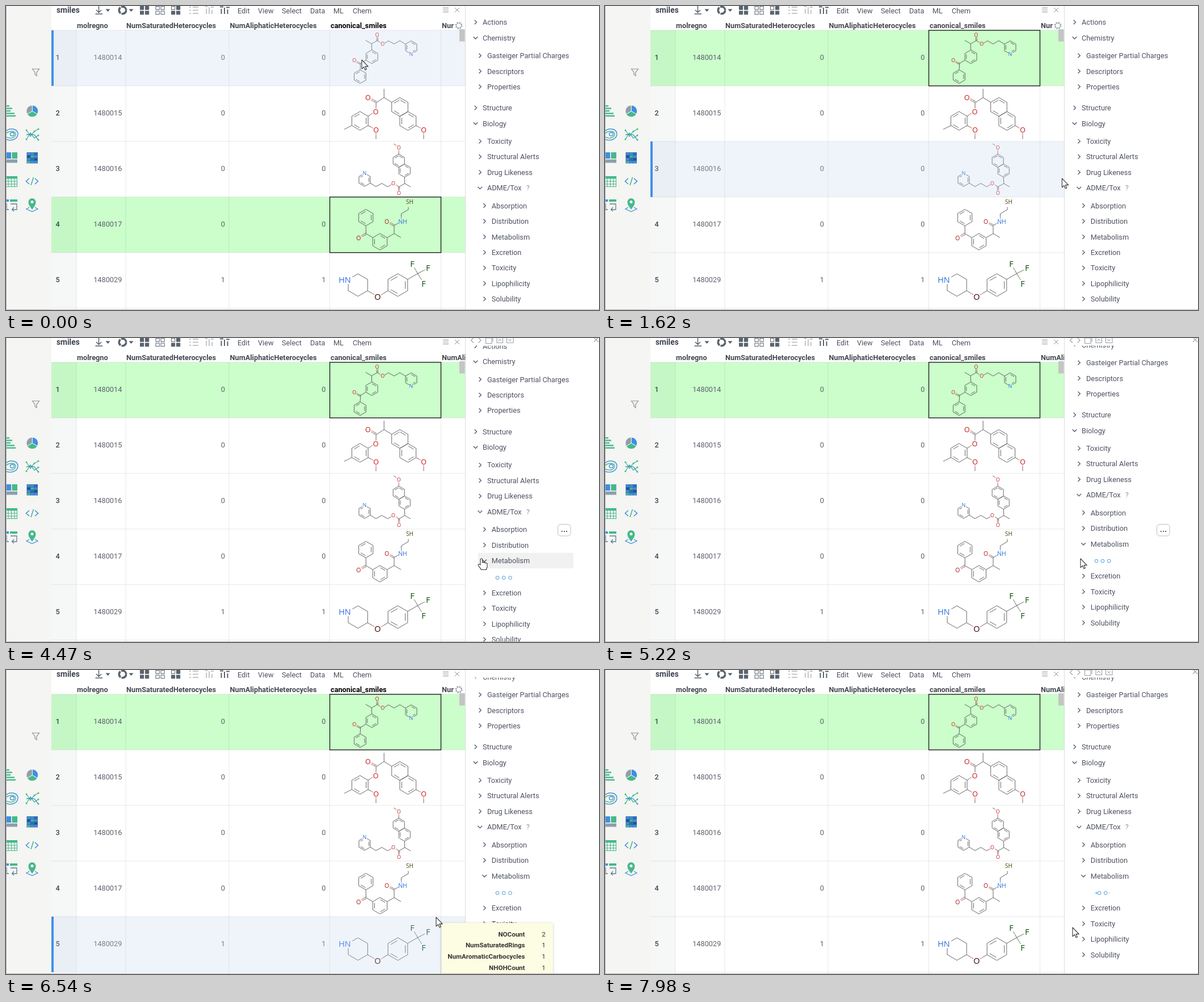
These frames come from a looping animation (1045 by 536 pixels, 8000 ms). An HTML page:

```html
<!DOCTYPE html>
<html lang="en">
<head>
<meta charset="utf-8">
<title>Molecule grid</title>
<style>
html, body { margin: 0; width: 100%; height: 100%; overflow: hidden; background: #fff; }
svg { display: block; width: 1045px; height: 536px; font: 12.74px Roboto, Arial, sans-serif; }
text { white-space: pre; }
.b { font-weight: 700; }
.m { font-weight: 500; }
.e { text-anchor: end; }
.c { text-anchor: middle; }
.l { fill: none; stroke: #4d5a66; stroke-width: 1.3; }
.atom { font-family: "Open Sans", "DejaVu Sans", sans-serif; text-anchor: middle; }
.tip text { font-size: 11.55px; fill: #333; }
</style>
</head>
<body>
<svg id="stage" viewBox="0 0 1045 536" xmlns="http://www.w3.org/2000/svg"></svg>
<script>
const LOOP = 8000, PITCH = 98, TOP = 42.8;
const INK = '#4d5261', BLUE = '#3f8fe0', GREEN = '#45b98a', STEEL = '#8d9fab';
const RED = '#c81818', NITRO = '#2c6fe0', FLUOR = '#0c4a0c';

const text = (x, y, s, cls = '', fill = INK, extra = '') =>
  `<text x="${x}" y="${y + 4.5}" class="${cls}" fill="${fill}" ${extra}>${s}</text>`;
const rect = (x, y, w, h, fill, extra = '') =>
  `<rect x="${x}" y="${y}" width="${w}" height="${h}" fill="${fill}" ${extra}/>`;
const line = (d, color, width = 1, extra = '') =>
  `<path d="${d}" fill="none" stroke="${color}" stroke-width="${width}" ${extra}/>`;
const fill = (d, color) => `<path d="${d}" fill="${color}"/>`;
const many = (n, f) => Array.from({ length: n }, (_, i) => f(i)).join('');

// ---- molecules ----
// Pointy-top hexagon; inner lines on the listed edges, a gap at one corner.
function ring(cx, cy, r, doubles = '', gap = -1) {
  const at = (k, q) => {
    const a = (k % 6) * Math.PI / 3 - Math.PI / 2;
    return [cx + q * Math.cos(a), cy + q * Math.sin(a)];
  };
  const edge = (k, q, trim) => {
    const a = at(k, q), b = at(k + 1, q);
    const mix = (p, o, f) => [p[0] + (o[0] - p[0]) * f, p[1] + (o[1] - p[1]) * f];
    const s = k === gap ? .42 : trim, e = (k + 1) % 6 === gap ? .42 : trim;
    const p = mix(a, b, s), o = mix(b, a, e);
    return `M${p.map(v => v.toFixed(1))}L${o.map(v => v.toFixed(1))}`;
  };
  return many(6, k => edge(k, r, 0)) + [...doubles].map(k => edge(+k, r * .76, .06)).join('');
}
const atom = (x, y, s, size, color) =>
  `<text x="${x}" y="${y + size * .36}" class="atom" font-size="${size}" fill="${color}">${s}</text>`;
const mol = (bonds, red, blue, atoms) =>
  line(bonds, '#4c4c4c', .85) + line(red, '#c04a4a', .85) + line(blue, '#4a7fd0', .85) +
  atoms.map(a => atom(...a)).join('');

const molecules = [
  mol(ring(624, 124.5, 12, '135') + ring(644.7, 89.5, 12, '024') + ring(714, 73, 11.6, '024', 3) +
    'M624 112.5L625 101L634.4 95.5M625 101L621.5 99.4M624.5 103L620.5 101M644.7 77.5L644.3 66.6L633.7 60.5' +
    'M644.3 66.6L654.3 61L658 63.4M653.3 61V57.5M655.4 61V57.5M669 64.5L674 61.4L684 67L694 61.2L704 67.2',
    'M653.3 57.5V54.5M655.4 57.5V54.5M621.5 99.4L618 97.6M620.5 101L617.2 99.2M658 63.4L660.3 64.8M667 65.6L669 64.5', 'M710 82L711.5 83',
    [[654, 50.3, 'O', 9, RED], [613.8, 96.2, 'O', 9, RED], [663.8, 67, 'O', 9, RED], [714, 84.7, 'N', 9, NITRO]]),
  mol(ring(623.8, 202.5, 16.5, '135') + ring(694, 178, 16.5, '035') + ring(708.3, 202.7, 16.5, '024') +
    'M596 217.5L609.5 210.7M638 194.2L642.5 191.4M638 210.7L643 213.3M652 179.5L652.2 170.5L666.2 161.5V146' +
    'M666.2 161.5L679.7 169.7M652.2 170.5L647.5 168M653 168.4L648.5 165.8M652 228.5V234.5M722.6 210.8L727 213.3M736 228.5V234.5',
    'M642.5 191.4L646.5 188.8M643 213.3L646.8 215.4M652 181V179.5M647.5 168L643 165.4M648.5 165.8L644 163.3M652 224V228.5M727 213.3L730.8 215.4M736 224V228.5', '',
    [[637.8, 161.7, 'O', 12.5, RED], [651.5, 186, 'O', 12.5, RED], [652, 218.3, 'O', 12.5, RED], [736, 218.3, 'O', 12.5, RED]]),
  mol(ring(692.2, 272.8, 11.6, '035') + ring(702.3, 290.2, 11.6, '024') + ring(632, 306.5, 11.6, '135', 0) +
    'M683.2 243L686 244.8M692.2 261.2V257.5M702.3 301.8L702.8 313L713 318.8M702.8 313L692.6 318.8L689 316.5' +
    'M691.5 318.8V322M693.6 318.8V322M677 316.2L672.5 318.7L662.2 312.7L652 318.4L642 312.3',
    'M686 244.8L688.4 246.4M692.2 257.5V254M689 316.5L687 315.2M691.5 322V325.3M693.6 322V325.3M677 316.2L679.4 314.8', '',
    [[692.2, 249.3, 'O', 9, RED], [682.6, 312.5, 'O', 9, RED], [692.4, 330, 'O', 9, RED], [632, 295, 'N', 9, NITRO]]),
  mol(ring(634.2, 373, 14.5, '135') + ring(659, 415.6, 14.5, '024') +
    'M634.2 387.5L634.4 401.5L646.5 408.4M634 400.3L630 402.7M635 402.7L631 405M671.6 408.4L684 401.3L696 408.3' +
    'M684 401.3V387L690 383.6M683.5 388L680 386M684.5 386L681 384M696.5 371V366.5L709 359V354.5',
    'M630 402.7L626 405M631 405L627 407M680 386L676 383.7M681 384L677 381.8', 'M690 383.6L692 382.4M696.5 375V371',
    [[621.3, 408.8, 'O', 10.5, '#a81818'], [671, 380.6, 'O', 10.5, '#a81818'], [699, 380.6, 'NH', 10.5, NITRO], [711.5, 345.3, 'SH', 10, '#54470c']]),
  mol(ring(620.2, 492, 19.8, '', 5) + ring(690.5, 492, 20, '135') +
    'M637.3 502L645 506.5M664.5 507.2L673.2 502M707.8 482L725.5 471.8L722.5 466.5M725.5 471.8L732 468.4M725.5 471.8L729.3 477.8',
    'M645 506.5L649.5 509.2M660.5 509.6L664.5 507.2', '',
    [[597, 482.4, 'HN', 14.5, NITRO], [655, 513.2, 'O', 14.5, '#3d0c08'], [716, 454.5, 'F', 14.5, FLUOR], [743.7, 462, 'F', 14.5, FLUOR], [736, 490, 'F', 14.5, FLUOR]]) +
    line('M722.5 466.5L719.3 461M732 468.4L738 465.3M729.3 477.8L732.6 483', '#3e6b3e', .85)
];

// ---- side icons ----
const wedge = (from, color) => {
  const at = a => `${46.3 + 10.4 * Math.cos(a)} ${185.4 + 10.4 * Math.sin(a)}`;
  return `<path d="M46.300 185.400L${at(from)}A10.400 10.400 0 0 1 ${at(from + 2.094)}Z" fill="${color}" stroke="#f5f5f3"/>`;
};
const sideIcons = () => {
  const pin = 'M46 359C41 352 39.500 349.500 39.500 345.500A6.500 6.500 0 0 1 52.500 345.500C52.500 349.500 51 352 46 359Z';
  return line('M46.500 111H58.500L54 117V123L51 120.500V117Z', '#8b9299', 1.2) +
    many(5, i => rect(0, 175 + i * 4.4, [6, 11, 8, 15, 17][i], 2.4, GREEN)) +
    wedge(-Math.PI / 2, BLUE) + wedge(Math.PI / 6, GREEN) + wedge(Math.PI * 5 / 6, STEEL) +
    line('M0 221C6 214 20 216 21 225C21 235 9 239 0 235', BLUE, 1.4) +
    line('M0 225C6 219 17 220 17 226C17 232 8 235 0 231', GREEN, 1.4) +
    '<ellipse cx="11" cy="226" rx="3.500" ry="3" fill="none" stroke="#3f8fe0" stroke-width="1.400"/>' +
    line('M36 219L43 229L50 221L57 217M36 235L43 224L50 233L57 228', GREEN, 1.3) + line('M36 227L43 226L50 227L57 236', BLUE, 1.3) +
    [[36, 219], [43, 229], [50, 221], [57, 217], [36, 235], [57, 228], [57, 236]].map(([x, y]) => `<circle cx="${x}" cy="${y}" r="1.500" fill="${GREEN}"/>`).join('') +
    rect(0, 258, 9, 11, BLUE) + rect(10.5, 258, 9.5, 11, GREEN) + rect(0, 270.5, 20, 6, STEEL) +
    rect(36.5, 258, 19.5, 19.5, '#2e6cae') +
    many(12, i => rect(37.3 + i % 3 * 6.3, 258.8 + (i / 3 | 0) * 4.8, 5.5, 3.8, [BLUE, '#2e6cae', GREEN, BLUE, '#28527f'][i * 3 % 5])) +
    rect(0, 300, 20, 4.5, GREEN) + line('M0 309H20M0 314H20M0 318.500H20M4 300V319M9.500 300V319M15 300V319M19.500 300V319', GREEN, 1.1) +
    line('M41 304L35.500 309L41 314M51 304L56.500 309L51 314', BLUE, 1.6) + line('M48.500 302L44 316', GREEN, 1.6) +
    rect(0, 341, 5, 4, BLUE) + rect(7, 341, 13, 4, GREEN) + line('M1 348V359H5M8 349H19V359H11M14 355L10.500 359L14 362', '#5a7f94', 1.3) +
    line('M41 355L36 358L46 362.500L56 358L51 355', BLUE, 1.3) + fill(pin, GREEN) + '<circle cx="46" cy="345.500" r="2.500" fill="#f5f5f3"/>';
};

// ---- toolbar ----
const squares = (x, solid) => many(4, i =>
  rect(x + (i % 2) * 9 + .5, (i >> 1) * 8.5 + .5, 6.2, 5.8, solid.includes(i) ? '#59636e' : 'none', 'stroke="#59636e"'));
const toolbar = () =>
  text(89, 7.1, 'smiles', 'b', '#3b4350', 'font-size="13.72"') +
  line('M163.500 0V11M159 7L163.500 11.500L168 7M157.500 14H170', '#4d5a66', 1.4) +
  fill('M175.500 5.500H183.500L179.500 10ZM216.500 5.500H224.500L220.500 10Z', '#4d5a66') +
  '<circle cx="205.500" cy="7.500" r="6.200" fill="none" stroke="#59636e" stroke-width="3.600" stroke-dasharray="11.500 1.500"/>' +
  squares(236, [0, 1, 2, 3]) + squares(263.5, []) + squares(291, [1, 2, 3]) +
  line('M329 2H339M329 7.500H339M329 13H339M323 2H326M323 7.500H326M323 13H326', '#c3c7cb', 1.8) +
  line('M353 14V5M358 14V2M363 14V7M351 1H355M361 2H366', '#c3c7cb', 2) +
  line('M379.500 14V5M385 14V3M390.500 14V6M377 1.500H383M388 2.500H394', '#59636e', 2) +
  [['Edit', 408], ['View', 444], ['Select', 486], ['Data', 536], ['ML', 577], ['Chem', 611]].map(([s, x]) => text(x, 8, s)).join('') +
  line('M770 3.500H780M770 7H780M770 10.500H780', '#8b9299') + line('M791 3L799 11M799 3L791 11', '#8b9299');

// ---- grid ----
const ids = [1480014, 1480015, 1480016, 1480017, 1480029];
const grid = () =>
  many(5, i => {
    const y = TOP + PITCH * i, mid = y + 47.5, n = i === 4 ? 1 : 0;
    return rect(80, y, 729, PITCH, '#fff', `id="row${i}"`) + text(87.5, mid, i + 1, 'm', '#3b4350') +
      text(204.3, mid, ids[i], 'e', '#5c616b') + text(386, mid, n, 'e', '#5c616b') + text(563.5, mid, n, 'e', '#5c616b');
  }) +
  rect(80, TOP, 44, 490, '#4a7060', 'opacity=".05"') +
  line(many(6, i => `M80 ${TOP + PITCH * i}H809`) + 'M124 42.500V535M211 42.500V535M393 42.500V535M570.500 42.500V535M766.500 42.500V535', '#000', 1, 'opacity=".085"') +
  molecules.join('') +
  rect(570.6, 0, 195.9, PITCH, 'none', 'id="cell" stroke="#222" stroke-width="1.400"') +
  rect(80, 0, 729, PITCH, '#c1d5f0', 'id="veil"') + rect(80, 0, 4, PITCH, '#428fe8', 'id="bar"') +
  [['molregno', 125], ['NumSaturatedHeterocycles', 212], ['NumAliphaticHeterocycles', 394.5]].map(([s, x]) => text(x, 34.3, s, 'b', '#43474d')).join('') +
  text(572, 34.3, 'canonical_smiles', 'b', '#43474d', 'id="smi"') +
  `<g clip-path="url(#head)">${text(768, 34.3, 'NumAliphaticRings', 'b', '#43474d')}</g>` +
  '<g id="gear"><circle cx="798" cy="34.500" r="4.300" fill="none" stroke="#9aa0a6" stroke-width="1.100"/>' +
  '<circle cx="798" cy="34.500" r="5.600" fill="none" stroke="#9aa0a6" stroke-width="1.800" stroke-dasharray="2.200 2.198"/></g>' +
  rect(799, 41, 9.5, 21.5, '#c4c4c4');

// ---- property tree: label, centre, level, open ----
const tree = [
  ['Actions', 28.5, 0], ['Chemistry', 56, 0, 1], ['Gasteiger Partial Charges', 87.5, 1], ['Descriptors', 115, 1],
  ['Properties', 142.3, 1], ['Structure', 179.5, 0], ['Biology', 207, 0, 1], ['Toxicity', 238.4, 1],
  ['Structural Alerts', 265.8, 1], ['Drug Likeness', 293.2, 1], ['ADME/Tox', 320.6, 1, 1], ['Absorption', 352, 2],
  ['Distribution', 379.5, 2], ['Metabolism', 407, 2], ['Excretion', 434.4, 2], ['Toxicity', 461.8, 2],
  ['Lipophilicity', 489.2, 2], ['Solubility', 516.6, 2]];
const OPENED = 13, EXTRA = 29.4;
const RIGHT = 'M-1.800 -3.800L2 0L-1.800 3.800', DOWN = 'M-3.800 -1.800L0 2L3.800 -1.800';
const panel = () =>
  rect(809, 0, 236, 536, '#fff') + line('M809.500 0V536', '#dcdcdc') +
  '<g clip-path="url(#tree)">' + rect(832, 0, 168, 27.4, '#f1f1f1', 'id="hover"') +
  tree.map(([s, , lv, open], i) => `<g id="n${i}">` +
    `<path class="l" d="${open ? DOWN : RIGHT}" transform="translate(${827.5 + lv * 7.8},0)"/>` +
    text(840 + lv * 7.9, 0, s) + (i === 10 ? text(917, 0, '?', '', '#8b9299', 'font-size="12"') : '') + '</g>').join('') +
  '<g id="dots" fill="none" stroke="#4a9be0">' + many(4, () => '<circle r="2.900"/>') + '</g></g>' +
  '<g id="more">' + rect(972.5, 328.5, 22.5, 20.5, '#fff', 'rx="5" stroke="#b9bdc2"') +
  text(984, 337, '...', 'c m', '#333', 'font-size="15"') + '</g>' +
  '<g id="tools">' + line('M824 -.500L819.500 4L824 8.500M832.500 -.500L837 4L832.500 8.500M845.500 0H856V9.500H845.500ZM848 0V-3M858 7V-2' +
    'M865 -2V8.500H875.500V-2M867.500 5L870 2L872.500 5M882.500 -2V8.500H894V-2M885.500 2L888 5L890.500 2M1036 -1L1044 7M1044 -1L1036 7', '#9aa0a6', 1.1) + '</g>';

const tipNames = ['NOCount', 'NumSaturatedRings', 'NumAromaticCarbocycles', 'NHOHCount', 'RingCount'];
const tip = (id, x, y, vals) => `<g id="${id}" class="tip" transform="translate(${x},${y})">` +
  rect(0, 0, 196, 119, '#fdfde3', 'filter="url(#soft)"') +
  tipNames.map((s, i) => text(147, 19 + i * 19.9, s, 'b e') + text(180, 19 + i * 19.9, vals[i], 'c')).join('') + '</g>';

const ARROW = 'M0 0V15.800L3.600 12.500L6 17.800L8.300 16.800L6 11.600H11.200Z';
const HAND = 'M-2 11V1.800A1.800 1.800 0 0 1 1.600 1.800V7A1.600 1.600 0 0 1 4.600 7.400A1.600 1.600 0 0 1 7.400 8.200A1.500 1.500 0 0 1 10 9.200V13.500C10 16 8.500 17 8.500 19.500H-.500C-1 17.500 -4 15 -5.800 11.800C-6.500 10 -4.500 9.200 -3.400 10.400Z';

document.getElementById('stage').innerHTML =
  '<defs><clipPath id="tree"><rect x="810" y="13.500" width="235" height="522"/></clipPath>' +
  '<clipPath id="head"><rect id="headBox" x="767" y="20" width="42" height="22"/></clipPath>' +
  '<filter id="soft" x="-10%" y="-10%" width="120%" height="125%"><feDropShadow dx="0" dy="1" stdDeviation="2" flood-opacity=".25"/></filter></defs>' +
  rect(0, 0, 1045, 536, '#fff') + rect(0, 0, 80, 536, '#f5f5f3') + sideIcons() + toolbar() + grid() + panel() +
  tip('tip1', 638, 144, [4, 0, 2, 0, 3]) + tip('tip2', 767.5, 446, [2, 1, 1, 1, 2]) +
  line('M.500 0V536M0 535.500H1045', '#b4b4b4') +
  '<path id="cursor" fill="#fff" stroke="#333" stroke-width="1.100" stroke-linejoin="round"/>';

// ---- motion ----
const $ = id => document.getElementById(id);
const set = (id, k, v) => $(id).setAttribute(k, v);
const show = (id, on) => set(id, 'opacity', +on);
const clamp = v => Math.max(0, Math.min(1, v));
const ramp = (t, a, b) => clamp((t - a) / (b - a));
const smooth = u => u * u * (3 - 2 * u);

const path = [[0, 627, 95], [1220, 627, 95], [1830, 872, 382], [2580, 872, 382], [2840, 848, 383],
  [3110, 838, 389], [5220, 838, 389], [5860, 758, 436], [6820, 758, 436], [7560, 824, 454], [LOOP, 824, 454]];
function pointer(t) {
  const i = Math.max(1, path.findIndex(p => p[0] > t)), a = path[i - 1], b = path[i];
  const u = smooth(ramp(t, a[0], b[0]));
  return [a[1] + (b[1] - a[1]) * u, a[2] + (b[2] - a[2]) * u];
}

function drawGrid(t, x, y) {
  const over = x < 809, picked = t < 480 ? 3 : 0;
  const hot = over ? Math.floor((y - TOP) / PITCH) : -1;
  for (let i = 0; i < 5; i++) set('row' + i, 'fill', i === picked ? '#cbfecb' : '#fff');
  set('veil', 'opacity', hot >= 0 ? .26 : 0);
  set('veil', 'y', TOP + PITCH * hot);
  show('bar', hot >= 0);
  set('bar', 'y', TOP + PITCH * hot);
  set('cell', 'y', TOP + PITCH * picked);
  set('smi', 'fill', over && x > 570 && x < 766 ? '#000' : '#43474d');
  set('headBox', 'width', over ? 22 : 42);
  show('gear', over);
  show('tools', !over);
  show('more', t > 1640 && t < 5600 && !over);
}

function drawTree(t, x, y) {
  const scroll = 14.5 * ramp(t, 2090, 2230) + 29.5 * ramp(t, 4760, 4870);
  const open = t >= 3510;
  let hot = null;
  tree.forEach(([, c], i) => {
    const cy = c - scroll + (open && i > OPENED ? EXTRA : 0);
    set('n' + i, 'transform', `translate(0,${cy.toFixed(2)})`);
    if (x > 832 && x < 1000 && Math.abs(y - cy) < 13.7) hot = cy;
  });
  $('n' + OPENED).firstChild.setAttribute('d', t >= 3310 ? DOWN : RIGHT);
  show('hover', hot !== null);
  set('hover', 'y', (hot || 0) - 13.7);
  drawDots(t, open, tree[OPENED][1] + 30.2 - scroll);
  return hot !== null;
}

// The first ring grows, two step right, the last one shrinks.
function drawDots(t, open, y) {
  show('dots', open);
  const u = ((t - 3490 + LOOP) % 1000) / 1000;
  const p = u < .5 ? 16 * u ** 5 : 1 - 16 * (1 - u) ** 5;
  const xs = [0, p, 1 + p, 2], sizes = [p, 1, 1, clamp(1 - 2 * p)];
  [...$('dots').children].forEach((c, i) => {
    c.setAttribute('cx', 866 + 11.2 * xs[i]);
    c.setAttribute('cy', y);
    c.setAttribute('r', 2.9 * sizes[i]);
    c.setAttribute('opacity', sizes[i] > .05 ? 1 : 0);
  });
}

function draw(t) {
  const [x, y] = pointer(t);
  drawGrid(t, x, y);
  const hand = drawTree(t, x, y);
  set('tip1', 'opacity', t >= 70 && t < 1290 ? ramp(t, 0, 210) : 0);
  show('tip2', t >= 5860 && t < 6890);
  set('cursor', 'd', hand ? HAND : ARROW);
  set('cursor', 'transform', `translate(${x.toFixed(2)},${y.toFixed(2)})`);
}

const start = performance.now();
function tick() {
  draw((performance.now() - start) % LOOP);
  requestAnimationFrame(tick);
}
tick();
</script>
</body>
</html>
```
